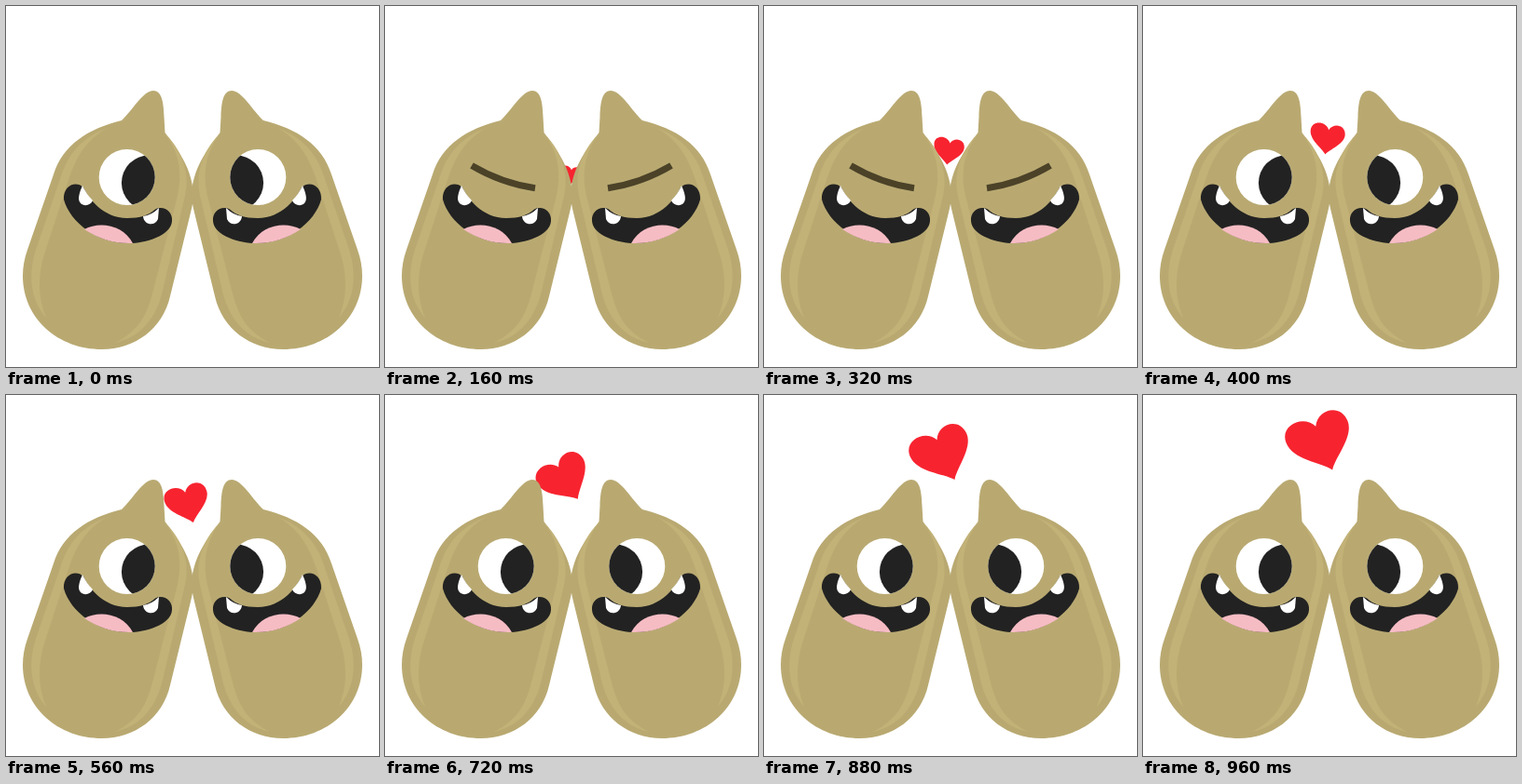
An HTML page that plays this animation: 400 by 388 pixels, repeating every 1 s.

```html
<!DOCTYPE html>
<html lang="en">
<head>
<meta charset="utf-8">
<title>Two seeds in love</title>
<style>
  html, body { margin: 0; width: 100%; height: 100%; overflow: hidden; background: #fff; }
  svg { display: block; width: 100%; height: 100%; }
</style>
</head>
<body>
<svg viewBox="0 0 400 388">
  <defs>
    <clipPath id="eye"><circle cx="129.7" cy="184" r="30"/></clipPath>
    <g id="seed">
      <path fill="#b9a971" d="M158 91C167 91 169 103 169.5 119L170.5 136C177 146 200 170 201 203Q201 210 198 222L176 312C168 347 138 369 103 369C56 369 18 336 18 290Q18 276 23 262L51 181C61 149 88 132 124 123C135 113 147 91 158 91Z"/>
      <g fill="#c2b277">
        <path d="M109 131C82 141 67 158 59 183L32 262C23 290 27 317 43 335C34 313 34 290 41 267L68 184C77 158 89 142 109 131Z"/>
        <path d="M171 137C190 158 197 179 192 204L168 306C161 336 144 356 117 362C140 350 150 336 157 309L183 208C190 180 186 159 171 137Z"/>
      </g>
      <path fill="#222" d="M83 195C88 206 104 228 130 228C144 228 153 225 160 218.5C169 214 179 221 178 231C177 247 149 255 132 255C98 255 69 233 62 208C61 193 75 187 83 195Z"/>
      <path fill="#f6bcc4" d="M84 240C100 231 126 235 136 255C116 256 99 250 84 240Z"/>
      <g fill="#fff">
        <path d="M82 193C79 200 76 208 80 212C84 216 91 214 93 209Q86 202 82 193Z"/>
        <path d="M147 226C148 236 160 237 163 229L164 217Q156 225 147 226Z"/>
      </g>
      <g class="open">
        <circle cx="129.7" cy="184" r="30" fill="#fff"/>
        <circle cx="153.5" cy="190" r="29.6" fill="#222" clip-path="url(#eye)"/>
      </g>
      <path class="shut" d="M93 171.5Q125 190.5 161 195.7" fill="none" stroke="#4b4228" stroke-width="7"/>
    </g>
  </defs>
  <!-- the heart turns about its middle -->
  <path id="heart" fill="#f72430" d="M0 34C-9 22 -36 9 -36 -11C-36 -31 -8 -33 0 -16C8 -33 34 -30 34 -9C34 9 8 22 0 34Z"/>
  <use href="#seed"/>
  <use href="#seed" transform="matrix(-1 0 0 1 400 0)"/>
</svg>
<script>
const LOOP = 1000, STEP = 40;
const heart = document.getElementById('heart');
const open = document.querySelector('.open');
const shut = document.querySelector('.shut');

// time, x of the heart's middle, tilt in degrees
const keys = [
  [0, 200, 8], [400, 198, 8], [560, 195, -15],
  [720, 192.8, -31], [880, 191.6, -24], [960, 191, -21]
];

function sway(t) {
  const i = Math.max(1, keys.findIndex(k => k[0] >= t));
  const a = keys[i - 1], b = keys[i];
  const p = (t - a[0]) / (b[0] - a[0]);
  return [1, 2].map(n => a[n] + (b[n] - a[n]) * p);
}

function draw(now) {
  const t = Math.floor(now % LOOP / STEP) * STEP;
  const [x, tilt] = sway(t);
  const y = 208 - 0.166 * t;
  const size = 0.2 + 0.8 * t / 960;
  heart.setAttribute('transform', `translate(${x} ${y}) rotate(${tilt}) scale(${size})`);
  heart.setAttribute('visibility', t < STEP ? 'hidden' : 'visible');

  const blink = t >= 40 && t < 400;
  open.setAttribute('visibility', blink ? 'hidden' : 'visible');
  shut.setAttribute('visibility', blink ? 'visible' : 'hidden');
}

const start = performance.now();
function tick() {
  draw(performance.now() - start);
  requestAnimationFrame(tick);
}
tick();
</script>
</body>
</html>
```
